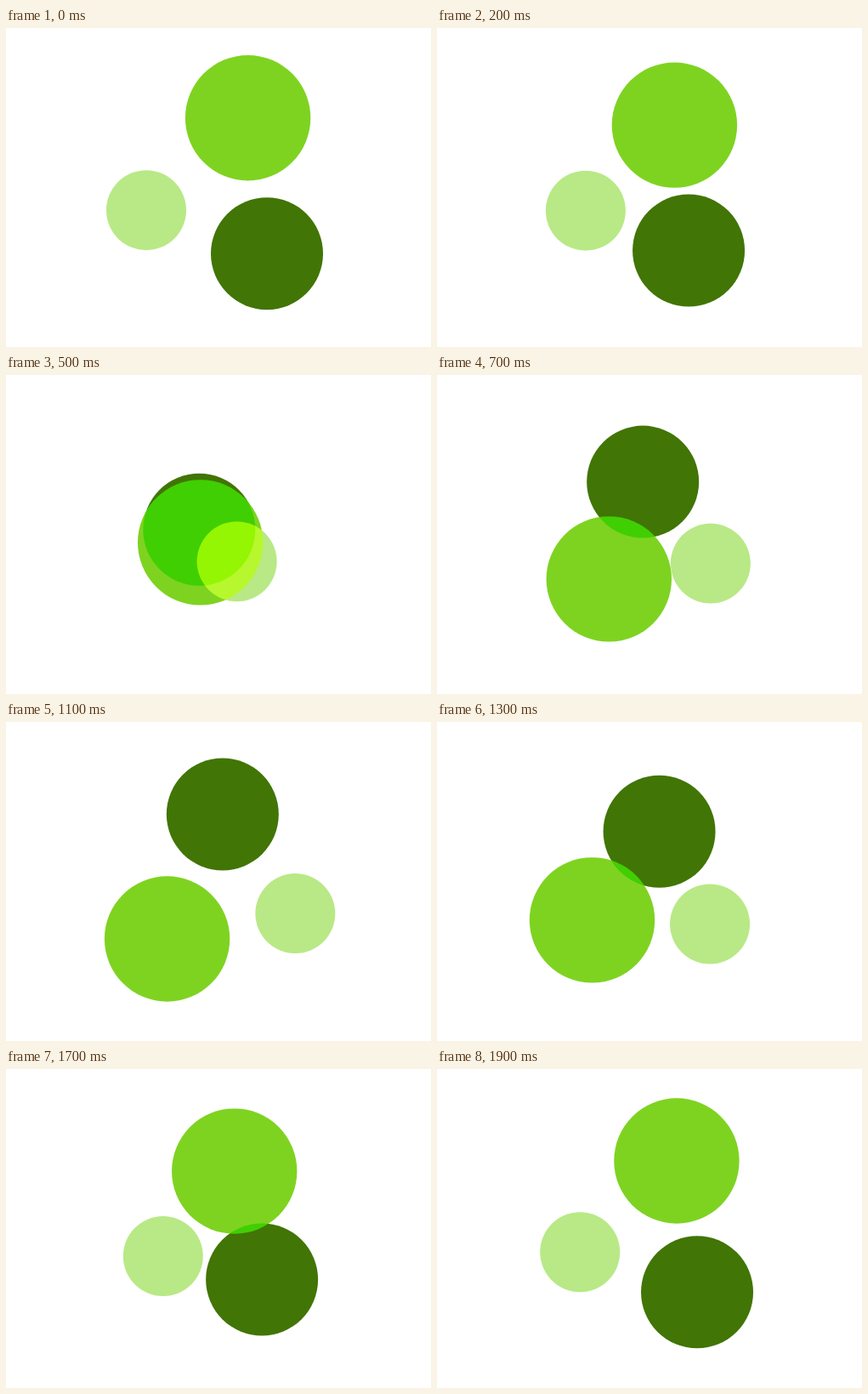
An HTML page with a canvas that plays this animation: 500 by 375 pixels, repeating every 2 s.

```html
<!DOCTYPE html>
<html lang="en">
<head>
<meta charset="utf-8">
<title>Three circles</title>
<style>
  html, body { margin: 0; width: 100%; height: 100%; overflow: hidden; background: #fff; }
  canvas { display: block; }
</style>
</head>
<body>
<canvas id="stage" width="500" height="375"></canvas>
<script>
const ctx = document.getElementById('stage').getContext('2d');
const LEG = 1000, STEP = 100;

function makePath(d) {
  const path = document.createElementNS('http://www.w3.org/2000/svg', 'path');
  path.setAttribute('d', d);
  const length = path.getTotalLength();
  return u => path.getPointAtLength(u * length);
}

// Bottom to top; each circle travels out and back along its own two paths.
const circles = [
  { color: '#b8e986', radius: 47, legs: [
    'M165 214.2 L341.5 222.5',
    'M341.5 222.5 C326 266 165 214.2 165 214.2'] },
  { color: '#7ed321', radius: 73.7, legs: [
    'M284.6 105.7 L192 256.7',
    'M192 256.7 C144 227 284.6 105.7 284.6 105.7'] },
  { color: '#417505', radius: 66, legs: [
    'M307 265.2 C167 222 254 106 254 106',
    'M254 106 L307 265.2'] },
].map(c => ({ ...c, legs: c.legs.map(makePath) }));

const bezier = (s, a, b) => 3 * (1 - s) ** 2 * s * a + 3 * (1 - s) * s * s * b + s ** 3;

// Cubic-bezier easing, solved by bisection.
function ease(x) {
  if (x <= 0) return 0;
  let low = 0, high = 1;
  for (let i = 0; i < 30; i++) {
    const mid = (low + high) / 2;
    if (bezier(mid, 0.62, 0.26) < x) low = mid; else high = mid;
  }
  return bezier(low, 0.04, 0.91);
}

function draw(now) {
  const time = Math.floor(now / STEP) * STEP % (2 * LEG);
  const leg = Math.floor(time / LEG);
  const progress = ease(time % LEG / LEG);

  ctx.clearRect(0, 0, 500, 375);
  ctx.globalCompositeOperation = 'overlay';
  for (const { color, radius, legs } of circles) {
    const { x, y } = legs[leg](progress);
    ctx.fillStyle = color;
    ctx.beginPath();
    ctx.arc(x, y, radius, 0, 2 * Math.PI);
    ctx.fill();
  }
  ctx.globalCompositeOperation = 'source-over';
}

function tick() {
  draw(performance.now());
  requestAnimationFrame(tick);
}
tick();
</script>
</body>
</html>
```
